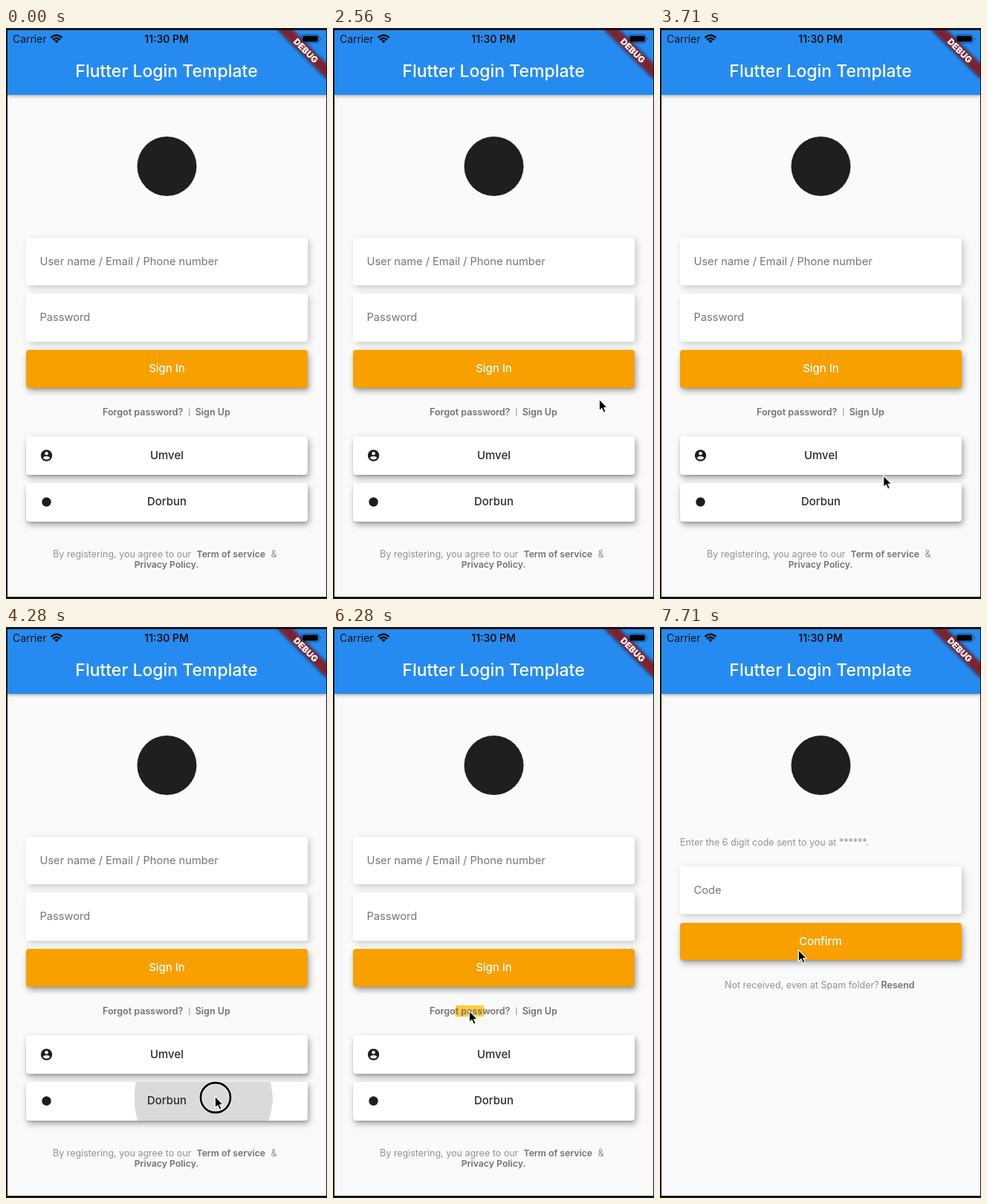
Recreate the animation shown at these times as an HTML page. Size 432 by 768 pixels, loop 8000 ms.

```html
<!DOCTYPE html>
<html lang="en">
<head>
<meta charset="utf-8">
<title>Login template</title>
<style>
  html, body { margin: 0; width: 100%; height: 100%; overflow: hidden; background: #141416; }
  .screen { position: absolute; left: 2px; top: 3px; width: 429px; height: 762px; background: #fafafa; }
  .bar { position: absolute; left: 2px; top: 3px; width: 429px; height: 87px; background: #268bf0;
    box-shadow: 0 2px 4px rgba(0,0,0,.28); clip-path: inset(0 0 -10px 0); }
  .page, .layer { position: absolute; left: 0; top: 0; width: 432px; height: 768px; }
  .card { position: absolute; left: 27px; width: 379px; height: 51.5px; border-radius: 4px; background: #fff;
    overflow: hidden; box-shadow: 2px 4px 8px rgba(0,0,0,.36), 0 2px 2px rgba(0,0,0,.1); }
  .field { height: 64.5px; box-shadow: 3px 3px 10px rgba(0,0,0,.2); }
  .primary { left: 27.4px; width: 378.2px; height: 50.8px; background: #f7a000; }
  .link { position: absolute; left: 126px; top: 509px; width: 116px; height: 15px; border-radius: 2px; overflow: hidden; }

  text { font-family: Inter, Roboto, sans-serif; font-size: 12.53px; fill: #929292; white-space: pre; }
  .mid { text-anchor: middle; }
  .title { font-size: 23px; font-weight: 500; fill: #fff; }
  .hint { font-size: 14.65px; fill: #757575; }
  .action { font-size: 14.9px; font-weight: 500; fill: #fff; }
  .dark { fill: #2b2b2b; }
  .strong { font-weight: 600; fill: #727272; }
  .legal { font-size: 12.25px; }
  .status { font-size: 13.9px; fill: #111; }
  .debug { font-size: 11.8px; font-weight: 900; fill: #fff; }

  .splash { position: absolute; width: 100px; height: 100px; margin: -50px; border-radius: 50%; opacity: 0; }
  .gray { left: 0; top: 22px; background: rgba(0,0,0,.145); animation: gray 8s linear infinite; }
  .amber { left: 58px; top: 8px; background: #ffcb3d; animation: amber 8s linear infinite; }
  .login { animation: login 8s step-end infinite; }
  .code { animation: code 8s step-end infinite; }
  .resend { animation: resend 8s step-end infinite; }
  .pointer { animation: move 8s ease-in-out infinite, enter 8s step-end infinite; }
  .ring { animation: press 8s step-end infinite; }

  @keyframes login { 0% { opacity: 1 } 82%, 100% { opacity: 0 } }
  @keyframes code { 0% { opacity: 0 } 82%, 100% { opacity: 1 } }
  @keyframes resend { 0% { opacity: 0 } 91%, 100% { opacity: 1 } }
  @keyframes enter { 0% { opacity: 0 } 8.8%, 100% { opacity: 1 } }
  @keyframes press {
    0%, 41%, 55.3%, 78.2%, 89% { opacity: 0 }
    37.3%, 51%, 76.4%, 87.3% { opacity: 1 }
  }
  @keyframes move {
    0%, 9% { transform: translate(300px, 620px) }
    19.3%, 21.4% { transform: translate(289px, 494px) }
    35.5%, 41% { transform: translate(369px, 501px) }
    49%, 57% { transform: translate(282px, 632px) }
    61.5%, 71% { transform: translate(294px, 707px) }
    76.4%, 82% { transform: translate(184px, 517px) }
    86.6%, 100% { transform: translate(187px, 435px) }
  }
  @keyframes gray {
    0%, 51.7% { opacity: 0; transform: translateX(255px) scale(.6) }
    51.8% { opacity: 1; transform: translateX(252px) scale(1.2) }
    53.4%, 55.2% { opacity: 1; transform: translateX(238.5px) scale(1.86) }
    57%, 100% { opacity: 0; transform: translateX(190px) scale(3.9) }
  }
  @keyframes amber {
    0%, 76.6% { opacity: 0; transform: scale(.12) }
    77%, 77.1% { opacity: 1; transform: scale(.25) }
    78.4%, 80.2% { opacity: 1; transform: scale(.4) }
    81.9%, 100% { opacity: 0; transform: scale(1.2) }
  }
</style>
</head>
<body>
<div class="screen"></div>
<div class="bar"></div>

<div class="page login">
  <div class="card field" style="top:281.5px"></div>
  <div class="card field" style="top:357px"></div>
  <div class="card primary" style="top:433px"></div>
  <div class="card" style="top:549px"></div>
  <div class="card" style="top:612px"><div class="splash gray"></div></div>
  <div class="link"><div class="splash amber"></div></div>
  <svg class="layer" viewBox="0 0 432 768">
    <text class="hint" x="45.5" y="318.5">User name / Email / Phone number</text>
    <text class="hint" x="45.5" y="394">Password</text>
    <text class="action mid" x="216.5" y="463">Sign In</text>
    <text class="strong" x="130" y="521">Forgot password?</text>
    <path d="M246.8 511.5V522" stroke="#929292"/>
    <text class="strong" x="254.7" y="521">Sign Up</text>
    <text class="action dark mid" x="216.5" y="580">Umvel</text>
    <text class="action dark mid" x="216.5" y="642">Dorbun</text>
    <circle cx="54.5" cy="575" r="7.7" fill="#1d1d1d"/>
    <circle cx="54.5" cy="572.2" r="2.3" fill="#fff"/>
    <path d="M49.9 578.3C50.5 575.2 58.5 575.2 59.1 578.3C57 581.3 52 581.3 49.9 578.3Z" fill="#fff"/>
    <circle cx="54.5" cy="637.5" r="6.2" fill="#1d1d1d"/>
    <text x="63" y="711.5">By registering, you agree to our</text>
    <text class="strong legal" x="256.5" y="711.5">Term of service</text>
    <text x="356.5" y="711.5">&amp;</text>
    <text class="strong legal mid" x="216" y="726">Privacy Policy.</text>
  </svg>
</div>

<div class="page code">
  <div class="card field" style="top:321.5px"></div>
  <div class="card primary" style="top:397.5px"></div>
  <svg class="layer" viewBox="0 0 432 768">
    <text x="27" y="293.5">Enter the 6 digit code sent to you at ******.</text>
    <text class="hint" x="45.5" y="358.5">Code</text>
    <text class="action mid" x="216" y="427.5">Confirm</text>
    <g class="resend">
      <text x="87" y="485.5">Not received, even at Spam folder?</text>
      <text class="strong" x="297.5" y="485.5">Resend</text>
    </g>
  </svg>
</div>

<svg class="layer" viewBox="0 0 432 768">
  <defs>
    <clipPath id="stage"><rect x="2" y="3" width="429" height="762"/></clipPath>
    <filter id="soft" x="-30%" y="-80%" width="160%" height="260%"><feGaussianBlur stdDeviation="2.8"/></filter>
  </defs>
  <text class="title mid" x="216" y="66">Flutter Login Template</text>
  <circle cx="216.5" cy="186" r="40" fill="#1f1f1f"/>

  <g clip-path="url(#stage)">
    <g transform="translate(431 3) rotate(45)">
      <rect x="-46" y="32" width="92" height="13.8" fill="#000" opacity=".65" filter="url(#soft)"/>
      <rect x="-46" y="32" width="92" height="13.8" fill="#b71c1c" opacity=".63"/>
      <text class="debug mid" x="0" y="43.2">DEBUG</text>
    </g>
  </g>

  <text class="status" x="9" y="20">Carrier</text>
  <text class="status mid" x="216" y="20" font-weight="600">11:30 PM</text>
  <g fill="none" stroke="#0b0b0b" stroke-width="2.4">
    <path d="M60.5 13.2Q68 6.4 75.5 13.2"/>
    <path d="M63 16Q68 11.6 73 16"/>
    <path d="M65.2 17.4Q68 15.2 70.8 17.4L68 20.4Z" fill="#0b0b0b" stroke="none"/>
  </g>
  <rect x="397.5" y="8.8" width="24" height="11.4" rx="3" fill="none" stroke="#000" stroke-opacity=".4"/>
  <rect x="399.3" y="10.5" width="20.5" height="8" rx="1.7"/>
  <path d="M423 12.5q2.4 2 0 4z" opacity=".45"/>

  <g class="pointer">
    <g class="ring" fill="none">
      <circle cy="1" r="20" stroke="#fff" stroke-width="4.6"/>
      <circle cy="1" r="20" stroke="#000" stroke-width="2.8"/>
    </g>
    <path d="M-.7 -.8V14.8L2.8 11.6L5.3 17.2L8.1 16L5.7 10.6H10.4Z" stroke="#fff" stroke-width="1.2" stroke-linejoin="round"/>
  </g>
</svg>
</body>
</html>
```
